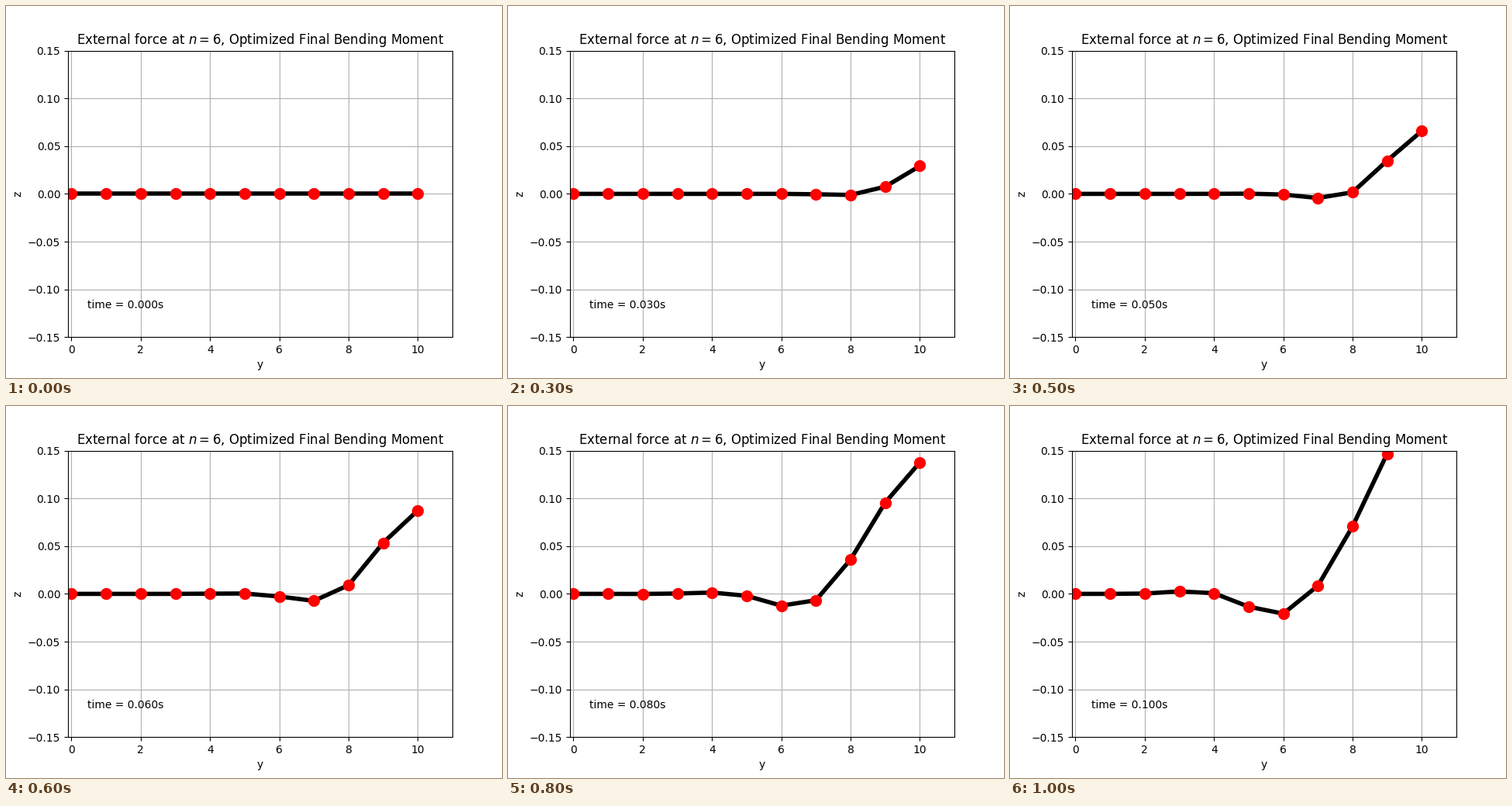
These frames come from a looping animation (640x480 px, 1100 ms). A matplotlib script:

```python
import numpy as np
import matplotlib.pyplot as plt
from matplotlib.animation import FuncAnimation

STEPS = 11
NODES = np.arange(11)
FIXED = 2          # clamped nodes at the root

# Per unit mass, with time counted in steps
BENDING = 0.102    # stiffness of each joint
TIP_SPRING = 0.187 # resists rotation of the last link
FORCE = 0.0078     # constant push on the last node

# Chain of masses joined by bending springs, solved by its vibration modes
curvature = np.diff(np.eye(len(NODES)), 2, axis=0)
tip_slope = np.diff(np.eye(len(NODES)), axis=0)[-1]
stiffness = (BENDING * curvature.T @ curvature
             + TIP_SPRING * np.outer(tip_slope, tip_slope))
w2, modes = np.linalg.eigh(stiffness[FIXED:, FIXED:])
omega = np.sqrt(w2)
sag = FORCE * modes[-1] / w2


def deflection(step):
    z = np.zeros(len(NODES))
    z[FIXED:] = modes @ (sag * (1 - np.cos(omega * step)))
    return z


fig, ax = plt.subplots(figsize=(6.4, 4.8), dpi=100)
ax.set(xlim=(-0.1, 11), ylim=(-0.15, 0.15), xlabel="y", ylabel="z",
       xticks=range(0, 11, 2), yticks=np.linspace(-0.15, 0.15, 7))
ax.set_title("External force at $n=6$, Optimized Final Bending Moment")
ax.grid()

beam, = ax.plot([], [], "o-", color="black", lw=4, markersize=10,
                markerfacecolor="red", markeredgecolor="red")
clock = ax.text(0.05, 0.1, "", transform=ax.transAxes)


def update(step):
    beam.set_data(NODES, deflection(step))
    clock.set_text(f"time = {step * 0.01:.3f}s")
    return beam, clock


anim = FuncAnimation(fig, update, frames=STEPS, interval=100,
                     repeat=True, repeat_delay=0)
plt.show()
```
